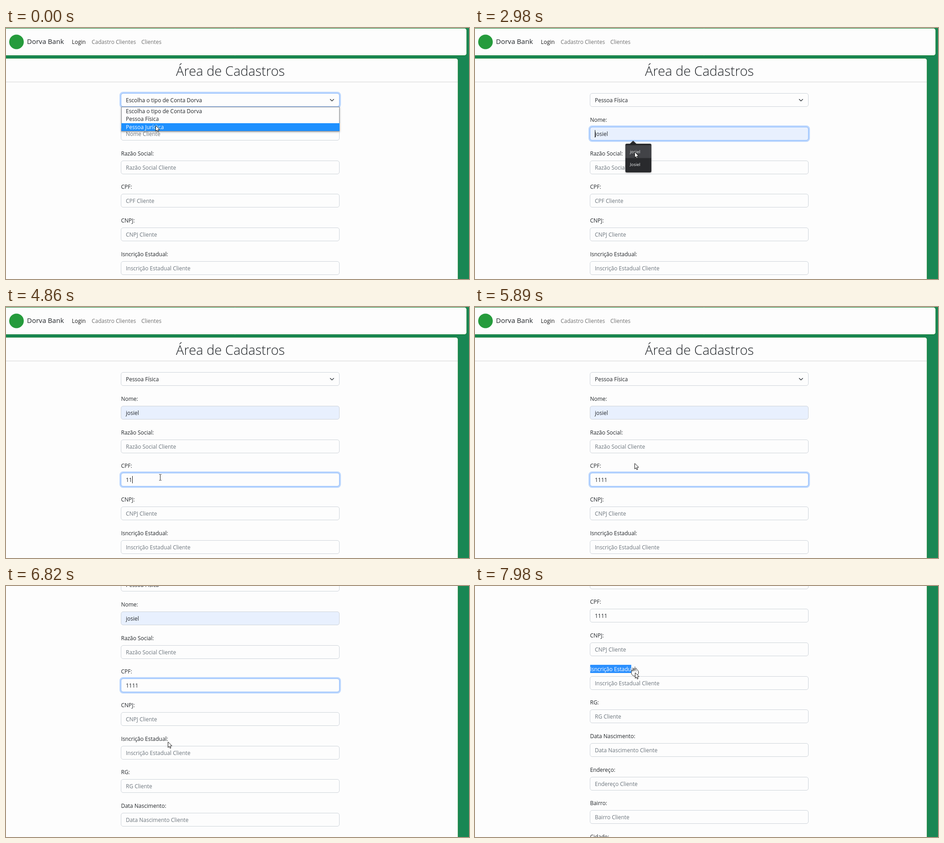
Write an HTML page with a canvas that moves like this. It is 1016 by 551 pixels and loops after 8000 ms.

```html
<!DOCTYPE html>
<html lang="pt-BR">
<head>
<meta charset="utf-8">
<title>Área de Cadastros</title>
<style>
  html, body { margin: 0; width: 100%; height: 100%; overflow: hidden; background: #198754; }
  canvas { display: block; }
</style>
</head>
<body>
<canvas id="stage" width="1016" height="551"></canvas>
<script>
const W = 1016, H = 551, LOOP = 8000;
const ctx = document.getElementById('stage').getContext('2d');

const PAPER = '#fdfdfd', INK = '#212529', MUTED = '#6c757d', GREEN = '#198754', EDGE = '#0b7a26';
const FACE = '"Open Sans", "Noto Sans", sans-serif';
const BODY = `11.95px ${FACE}`, SMALL = `9.4px ${FACE}`;

const LEFT = 252, WIDTH = 480, TALL = 30, PAD = 263;
const FIRST = 217.1, ROW = 73.67;
const LABELS = ['Nome', 'Razão Social', 'CPF', 'CNPJ', 'Isncrição Estadual', 'RG',
  'Data Nascimento', 'Endereço', 'Bairro', 'Cidade'];
const ACCOUNTS = ['Escolha o tipo de Conta Dorva', 'Pessoa Física', 'Pessoa Jurídica'];
const NAME = 'josiel', CPF = '1111', SELECTED = 'Isncrição Estadual:';

// Event times and durations in ms
const T = { hover: 270, pick: 520, tip: 1370, name: 1780, preview: 2760, accept: 3090,
  cpf: 4240, type: 4640, drag: 7480 };
const KEY_GAP = 170, BLINK = 500, PRESS = 80, FADE = 150;

// Wheel notches: three in a row, then one more
const NOTCH = 78.5, GLIDE = 160;
const WHEEL = [6606, 6708, 6810, 7180];

// Pointer moves: start, end, x, y
const HOME = [328, 214];
const MOVES = [
  [60, 330, 326, 201],
  [600, 810, 327, 232],
  [2580, 2900, 350, 272],
  [3150, 4200, 338, 374],
  [5530, 5890, 350, 343],
  [6190, 6900, 355, 342],
  [7040, 7440, 231, 184],
  [T.drag, 7960, 351, 190],
];

const clamp = v => Math.max(0, Math.min(1, v));
const within = (v, a, b) => v >= a && v < b;
const smooth = p => p * p * (3 - 2 * p);
const easeOut = p => 1 - (1 - p) ** 2;
const fade = (t, on, off) => clamp((t - on) / FADE) - clamp((t - off) / FADE);
const blink = (t, since) => (t - since) % (2 * BLINK) < BLINK;

const scrollAt = t => Math.round(
  WHEEL.reduce((sum, s) => sum + NOTCH * easeOut(clamp((t - s) / GLIDE)), 0));

const pointerAt = t => MOVES.reduce(([x, y], [from, to, nx, ny]) => {
  const e = smooth(clamp((t - from) / (to - from)));
  return [x + (nx - x) * e, y + (ny - y) * e];
}, HOME);

const pressed = t => t >= T.drag ||
  [T.pick, T.name, T.accept, T.cpf].some(c => within(t, c, c + PRESS));

const nameListOpen = t => within(t, T.name, T.accept);

// The hovered element is only re-checked a moment after scrolling.
function overField(t, x, y) {
  if (t < T.pick || (nameListOpen(t) && y > 250)) return false;
  const offset = y + scrollAt(t - 120) - FIRST;
  return offset >= 0 && offset % ROW < TALL && within(x, LEFT, LEFT + WIDTH);
}

function rect(x, y, w, h, color) {
  ctx.fillStyle = color;
  ctx.fillRect(x, y, w, h);
}

function panel(x, y, w, h, r, fill, stroke, line = 1) {
  ctx.beginPath();
  ctx.roundRect(x, y, w, h, r);
  if (fill) { ctx.fillStyle = fill; ctx.fill(); }
  if (stroke) { ctx.strokeStyle = stroke; ctx.lineWidth = line; ctx.stroke(); }
}

function poly(points, close) {
  ctx.beginPath();
  points.forEach(([x, y]) => ctx.lineTo(x, y));
  if (close) ctx.closePath();
}

function circle(x, y, r) {
  ctx.beginPath();
  ctx.arc(x, y, r, 0, Math.PI * 2);
}

function outline(color, line = 1) {
  ctx.strokeStyle = color;
  ctx.lineWidth = line;
  ctx.stroke();
}

function text(str, x, y, color = INK, font = BODY, align = 'left') {
  ctx.font = font;
  ctx.fillStyle = color;
  ctx.textAlign = align;
  ctx.fillText(str, x, y);
}

function widthOf(str) {
  ctx.font = BODY;
  return ctx.measureText(str).width;
}

function shadowed(blur, draw) {
  ctx.save();
  ctx.shadowColor = 'rgba(0,0,0,.4)';
  ctx.shadowBlur = blur;
  ctx.shadowOffsetY = 1;
  draw();
  ctx.restore();
}

function field(y, focus = 0, fill = PAPER) {
  if (focus) {
    panel(LEFT - 1, y - 1, WIDTH + 2, TALL + 2, 6, null, `rgba(13,110,253,${0.27 * focus})`, 4);
  }
  panel(LEFT + 0.5, y + 0.5, WIDTH - 1, TALL - 1, 4.5, fill, '#ced4da');
  if (focus) {
    panel(LEFT + 0.5, y + 0.5, WIDTH - 1, TALL - 1, 4.5, null, `rgba(134,183,254,${focus})`);
  }
}

function fieldText(value, hint, y) {
  text(value || hint, PAD, y + 19.5, value ? INK : MUTED);
}

function caret(after, y) {
  rect(Math.round(PAD + widthOf(after)), y + 7, 1, 16, '#111');
}

function squiggle(y, w) {
  ctx.beginPath();
  for (let i = 0; i <= w; i += 2) ctx.lineTo(PAD + i, y + (i % 4 ? 1 : -1));
  outline('#e5322d');
}

function drawPage(s) {
  rect(0, 0, W, H, GREEN);
  panel(-20, 0.5 - s, 1031, 60, 5, PAPER, EDGE);
  circle(23, 30.5 - s, 16);
  ctx.fillStyle = '#259b3c';
  ctx.fill();
  text('Dorva Bank', 46, 34.5 - s, INK, `15px ${FACE}`);
  text('Login', 144.5, 35 - s, '#191919');
  text('Cadastro Clientes', 188, 35 - s, '#707070');
  text('Clientes', 297, 35 - s, '#707070');

  panel(-20, 66.5 - s, 1012, 1400, 5, PAPER, EDGE);
  text('Área de Cadastros', 492.5, 105 - s, INK, `300 29.1px ${FACE}`, 'center');
  rect(0, 118 - s, 991, 1, '#d3d4d5');
}

function drawSelect(t, s) {
  const y = 143 - s;
  field(y, 1 - clamp((t - T.name) / FADE));
  text(ACCOUNTS[t < T.pick ? 0 : 1], PAD, y + 20);
  ctx.lineCap = ctx.lineJoin = 'round';
  poly([[711.5, y + 13.5], [715.3, y + 17.3], [719.1, y + 13.5]]);
  outline('#343a40', 1.5);
}

function drawLabel(label, y, t) {
  const x = 252.5;
  text(label, x, y);
  if (t < T.drag || label !== SELECTED) return;
  // Selected letters trail slightly behind the pointer.
  const reach = pointerAt(t)[0] - 8;
  let n = 0;
  while (n < label.length && x + widthOf(label.slice(0, n + 1)) <= reach) n++;
  ctx.save();
  ctx.beginPath();
  ctx.rect(x, y - 14, widthOf(label.slice(0, n)), 18);
  ctx.clip();
  rect(x, y - 14, 120, 18, '#2b90ff');
  text(label, x, y, '#fff');
  ctx.restore();
}

function drawName(t, y) {
  const value = t >= T.preview ? NAME : '';
  const accepted = t >= T.accept;
  field(y, fade(t, T.name, T.cpf), value ? '#e8f0fe' : PAPER);
  fieldText(value, 'Nome Cliente', y);
  if (!within(t, T.name, T.cpf)) return;
  if (accepted) squiggle(y + 22, widthOf(NAME));
  if (blink(t, accepted ? T.accept : T.name)) caret(accepted ? NAME : '', y);
}

function drawCpf(t, y) {
  const typed = Math.max(0, Math.min(CPF.length, 1 + Math.floor((t - T.type) / KEY_GAP)));
  const value = CPF.slice(0, typed);
  field(y, fade(t, T.cpf, T.drag));
  fieldText(value, 'CPF Cliente', y);
  const since = typed ? T.type + (typed - 1) * KEY_GAP : T.cpf;
  if (within(t, T.cpf, T.drag) && blink(t, since)) caret(value, y);
}

function drawForm(t, s) {
  drawSelect(t, s);
  LABELS.forEach((name, i) => {
    const y = Math.round(FIRST + ROW * i - s);
    drawLabel(name + ':', y - 11, t);
    if (name === 'Nome') return drawName(t, y);
    if (name === 'CPF') return drawCpf(t, y);
    field(y);
    fieldText('', name.replace('Isn', 'Ins') + ' Cliente', y);
  });
}

function drawDropdown(t) {
  const step = 17.3, active = t < T.hover ? 2 : 1;
  shadowed(4, () => rect(253, 173, 479, 54, '#8b8f94'));
  rect(254, 174, 477, 52, PAPER);
  rect(253, Math.round(174 + active * step), 479, 17, '#1e90ff');
  ACCOUNTS.forEach((a, i) => text(a, PAD, 187 + i * step, i === active ? '#fff' : INK));
}

function drawPopup(top, items, active) {
  const step = 28;
  shadowed(3, () => {
    panel(330, top, 57, 7 + items.length * step, 3, '#292a2d');
    poly([[340, top], [347, top - 6.5], [354, top]], true);
    ctx.fill();
  });
  if (active >= 0) rect(330, top + 3.5 + active * step, 57, step, '#424347');
  items.forEach((s, i) => text(s, 340, top + 21 + i * step, '#f1f3f4', SMALL));
}

function drawTooltip() {
  panel(333.5, 244.5, 102, 18, 0, '#fff', '#777');
  text('Preencha este campo.', 384.5, 257, '#575757', `9px ${FACE}`, 'center');
}

function drawBeam() {
  rect(0, -6, 1, 12, '#222');
  for (const y of [-7, 6]) {
    rect(-2, y, 2, 1, '#222');
    rect(1, y, 2, 1, '#222');
  }
}

function drawArrow() {
  ctx.lineJoin = 'miter';
  poly([[0.5, 0.5], [0.5, 12.5], [3.2, 10], [5, 14.3], [7, 13.4], [5.2, 9.3], [8.8, 9]], true);
  ctx.fillStyle = '#fff';
  ctx.fill();
  outline('#111');
}

function drawPointer(t) {
  const [x, y] = pointerAt(t);
  ctx.save();
  ctx.translate(Math.round(x), Math.round(y));
  if (pressed(t)) {
    circle(0, 0, 8);
    outline('#333');
  }
  if (overField(t, x, y)) drawBeam();
  else drawArrow();
  ctx.restore();
}

function render(t) {
  const s = scrollAt(t);
  drawPage(s);
  drawForm(t, s);
  if (t < T.pick) drawDropdown(t);
  if (within(t, T.tip, T.name)) drawTooltip();
  if (nameListOpen(t)) drawPopup(254, [NAME, 'Josiel'], t >= T.preview ? 0 : -1);
  if (within(t, T.cpf + 60, T.type)) drawPopup(401, [CPF], -1);
  drawPointer(t);
}

function tick() {
  render(performance.now() % LOOP);
  requestAnimationFrame(tick);
}
tick();
</script>
</body>
</html>
```
